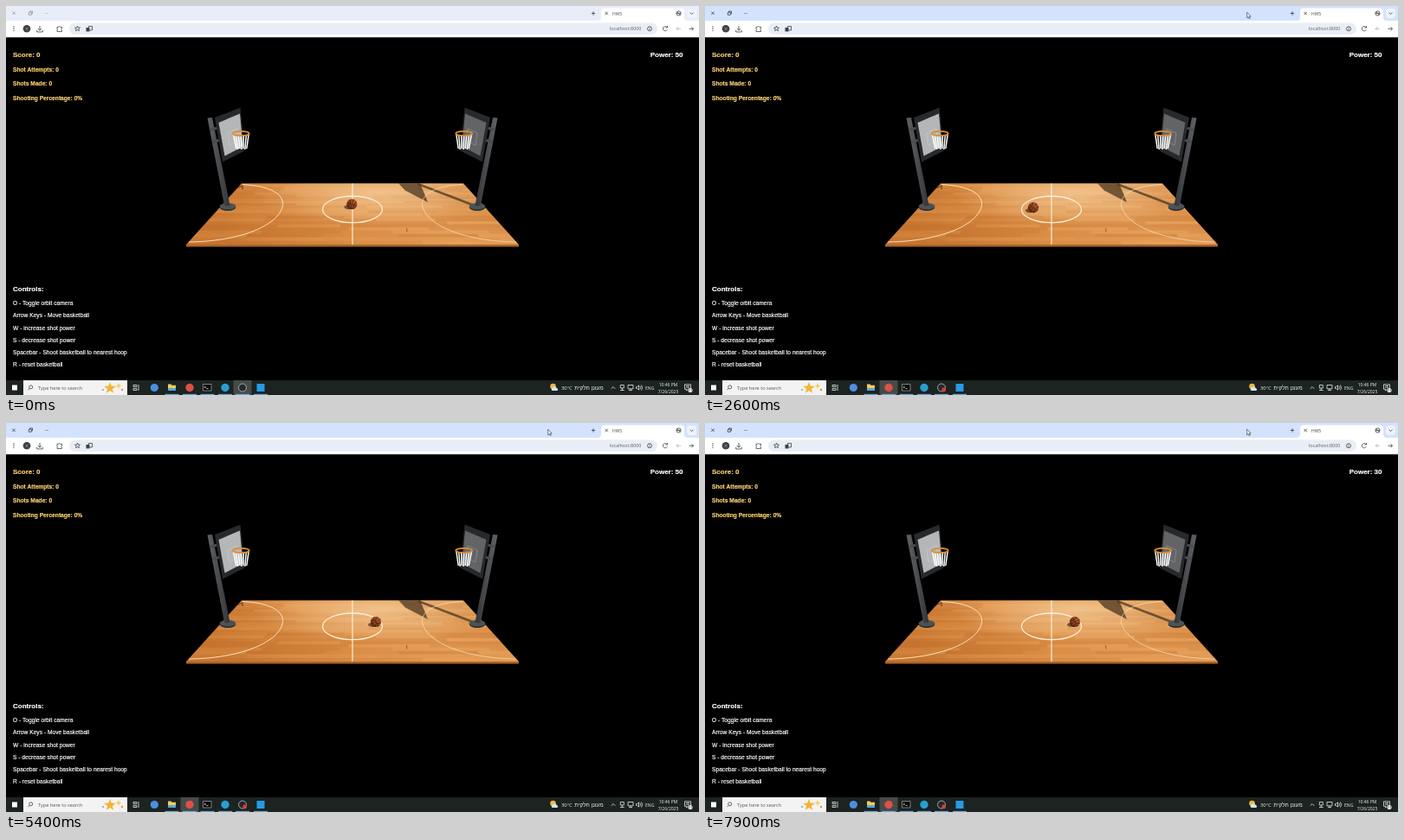
Write an HTML page that moves like this. It is 800 px wide and 450 px high and loops after 8 s.

```html
<!DOCTYPE html>
<html lang="en">
<head>
<meta charset="utf-8">
<title>Basketball court</title>
<style>
html, body { margin: 0; height: 100%; overflow: hidden; background: #000; }
svg { display: block; width: 100vw; height: 100vh; }
text { white-space: pre; }
.hud { font: 6.67px "Liberation Sans", Arial, sans-serif; fill: #fff; stroke: #fff; stroke-width: .18; }
.b { font-weight: bold; }
.big { font-size: 8px; font-weight: bold; }
.gold { fill: #ffd373; stroke: #ffd373; }
.ui { font: 5.5px "Open Sans", "Liberation Sans", sans-serif; }
.line { fill: none; stroke: #3c4043; stroke-width: .8; }
.pale { fill: none; stroke: #e8e8e8; stroke-width: .8; }
</style>
</head>
<body>
<svg viewBox="0 0 800 450">
  <defs>
    <linearGradient id="wood" x1="0" x2="1" y1=".2" y2="0">
      <stop offset="0" stop-color="#c97731"/>
      <stop offset=".35" stop-color="#dc9048"/>
      <stop offset=".65" stop-color="#e29b55"/>
      <stop offset="1" stop-color="#d98d47"/>
    </linearGradient>
    <radialGradient id="shine">
      <stop offset="0" stop-color="#ffe6bf" stop-opacity=".5"/>
      <stop offset="1" stop-color="#ffe6bf" stop-opacity="0"/>
    </radialGradient>
    <radialGradient id="leather" cx=".65" cy=".35" r=".75">
      <stop offset="0" stop-color="#b85a2b"/>
      <stop offset=".6" stop-color="#8a4020"/>
      <stop offset="1" stop-color="#3c1a0c"/>
    </radialGradient>
    <linearGradient id="steel">
      <stop offset="0" stop-color="#606265"/>
      <stop offset="1" stop-color="#333538"/>
    </linearGradient>
    <clipPath id="floor"><path d="M272 205.2H528L592 276H208Z"/></clipPath>
    <g id="hoop">
      <ellipse cx="256" cy="233" rx="9.3" ry="4" fill="#2b3034"/>
      <ellipse cx="256" cy="231.6" rx="9.3" ry="3.7" fill="#4b5358"/>
      <path d="M232.5 129.5L238 129L258.500 230.500Q255 232.500 252 230.500Z" fill="url(#steel)"/>
      <path d="M236 143L247 140.500M238 157.500L249 154.500" stroke="#4a4d50" stroke-width="3"/>
      <path d="M241 129L270.500 117.500L275.500 167.500L250 180.500Z" fill="#27292c"/>
      <path d="M245.500 135L270 124.500L273.500 162.500L252.500 173.500Z" fill="currentColor"/>
      <path d="M256 147L267 142L269 156L258 161Z" fill="none" stroke="#fff" stroke-opacity=".2"/>
      <path id="net" fill="none" stroke="#fff" stroke-width="1.5"/>
      <ellipse cx="271.300" cy="147.500" rx="9.500" ry="2.700" fill="none" stroke="#dc8e35" stroke-width="1.700"/>
    </g>
  </defs>

  <rect width="800" height="450"/>

  <path d="M208 276H592V278.500H208Z" fill="#a9652c"/>
  <g clip-path="url(#floor)">
    <rect x="208" y="205" width="384" height="71" fill="url(#wood)"/>
    <g id="planks"></g>
    <ellipse cx="428" cy="218" rx="140" ry="36" fill="url(#shine)"/>
    <path d="M453 205H478L487 227L461 213.500Z" fill="#4a361f" opacity=".75"/>
    <path d="M476 206L541 231" stroke="#4a361f" stroke-width="2.700" opacity=".75"/>
    <path d="M261 213L273 208V212" fill="none" stroke="#4a2c16" stroke-width="1.300" opacity=".7"/>
    <g fill="none" stroke="#fff0d8" stroke-width="1">
      <path d="M400 205V276" stroke-width="1.200"/>
      <ellipse cx="400" cy="235.300" rx="34.500" ry="15.300" stroke-width="1.300"/>
      <path id="arc" d="M273 206.500C306 208 319.500 218 319.500 228.500C319.500 249 280 272 211 273" opacity=".85"/>
      <use href="#arc" transform="matrix(-1 0 0 1 800 0)" opacity=".7"/>
    </g>
    <path d="M462.500 257L463 261.500" stroke="#c9472a" stroke-width="1"/>
  </g>
  <use href="#hoop" color="#b4b6b8"/>
  <use href="#hoop" color="#626466" transform="matrix(-1 0 0 1 800 0)"/>

  <g id="ball">
    <ellipse cx="-3.500" cy="3.300" rx="5.500" ry="2.600" fill="#3a2010" opacity=".65"/>
    <circle r="6" fill="url(#leather)"/>
    <path id="seams" d="M-6 0H6M0 -6V6M-4.200 -4.200Q0 0 -4.200 4.200M4.200 -4.200Q0 0 4.200 4.200" fill="none" stroke="#2a120a" stroke-width=".5"/>
  </g>

  <g class="hud" id="hud"></g>

  <rect id="tabs" width="800" height="17"/>
  <path d="M683 17Q687 17 687 13V6Q687 2.500 691 2.500H779Q783 2.500 783 6V13Q783 17 787 17Z" fill="#fff"/>
  <rect y="17" width="800" height="19.250" fill="#fff"/>
  <rect x="73" y="19.500" width="679" height="13.500" rx="6.700" fill="#e9eef6"/>
  <g id="windowIcons" class="line">
    <path d="M7.300 6.600L10.700 10M10.700 6.600L7.300 10M26.300 7.300h3v3h-3zM27.500 7V6h3v3h-1"/>
    <path d="M45 8.500h4" opacity=".5"/>
  </g>
  <rect x="786" y="3" width="11" height="11" rx="3.500" fill="#eef3fd"/>
  <g class="line">
    <path d="M678 6.300v4.400M675.800 8.500h4.400M691.500 6.800l3.400 3.400M694.900 6.800l-3.400 3.400M789.600 7.600l2 2l2 -2"/>
    <circle cx="776.500" cy="8.500" r="2.600"/>
    <path d="M774 8.500h5M775 6.500l3 4"/>
    <path d="M39 23v5M36.800 26l2.200 2.300l2.200 -2.300M35.700 28v2h6.600v-2"/>
    <path d="M59 24.300h1.700q.8 -2 1.800 0h2v2q-1.600 .8 0 1.600v1.700h-5.500v-1.700q1.400 -.8 0 -1.600z"/>
    <path d="M82.500 23.200l.9 2h2.100l-1.600 1.400l.5 2.100l-1.900 -1.100l-1.900 1.100l.5 -2.100l-1.600 -1.400h2.100z"/>
    <circle cx="743" cy="26.300" r="2.500"/>
    <path d="M743 26v1.600M743 24.500v.7M763.300 25a2.600 2.600 0 1 0 0 2.400M763.500 23v2h-2"/>
    <path d="M779 26.300h-5M776 24.200l-2 2.100l2 2.100" stroke="#aeb1b5"/>
    <path d="M788.500 26.300h5M791.500 24.200l2 2.100l-2 2.100"/>
    <path d="M95.500 23.500h4v4.500h-4z"/>
  </g>
  <g fill="#3c4043">
    <circle cx="9" cy="24" r=".7"/><circle cx="9" cy="26.300" r=".7"/><circle cx="9" cy="28.600" r=".7"/>
    <circle cx="24" cy="26.300" r="4.300"/>
    <path d="M92.500 25h4v4.500h-4z"/>
  </g>
  <path d="M22.500 25l3 2.800M25.500 25l-3 2.800" stroke="#9aa4ad" stroke-width=".8"/>
  <g class="ui" fill="#45484c">
    <text x="700" y="10.500" font-size="5">HW5</text>
    <text x="697" y="28.300" fill="#5b5f64" font-size="5.400">localhost:8000</text>
  </g>

  <rect y="433" width="800" height="17" fill="#1c2321"/>
  <rect id="active" y="433" width="21" height="17" fill="#454b49"/>
  <rect x="7" y="438.500" width="6" height="6" fill="#fff"/>
  <rect x="20" y="433" width="120" height="17" fill="#f3f3f3"/>
  <circle cx="28.700" cy="440.800" r="2" class="line"/>
  <path d="M27.200 442.400L25.500 444.200" class="line"/>
  <g fill="#f3b52e">
    <path d="M120 435l1.800 4.600l5 .3l-4 3l1.400 4.800l-4.200 -2.800l-4.200 2.800l1.400 -4.800l-4 -3l5 -.3z"/>
    <path d="M130 436l1 2.500l2.500 1l-2.500 1l-1 2.500l-1 -2.500l-2.500 -1l2.500 -1z" fill="#f7cc55"/>
    <circle cx="134" cy="444" r="1.200" fill="#e58e35"/><circle cx="112" cy="444" r="1" fill="#69a9dd"/>
  </g>
  <path class="pale" d="M147 438.500h4v2h-4zM147 442.500h4v2h-4zM153 438v7"/>
  <circle cx="171.300" cy="441.500" r="4.600" fill="#4b8fdf"/>
  <path d="M187 437.500h3.500l1 1.200h4.500v6.300h-9z" fill="#f5cb5c"/>
  <path d="M187 442h9v3h-9z" fill="#58a6d6"/>
  <circle cx="212" cy="441.500" r="4.700" fill="#dd5144"/>
  <path d="M227.500 437.500h9.500v7.500h-9.500z" fill="#080808" stroke="#a9adb0" stroke-width=".7"/>
  <path d="M229 440l1.500 1l-1.500 1M231.500 442.500h2" class="pale"/>
  <circle cx="253" cy="441.500" r="4.700" fill="#279fd2"/>
  <circle cx="273" cy="441.500" r="4.500" fill="#25282c" stroke="#d8dadc" stroke-width=".7"/>
  <circle id="recording" cx="275.700" cy="444" r="2.400" fill="#e33b36"/>
  <rect x="289.500" y="437" width="9" height="9" fill="#259be5"/>
  <path d="M183.500 449.400h16M204 449.400h16M224.500 449.400h16M245 449.400h16M265 449.400h16M286 449.400h16" stroke="#76b9ed" stroke-width="1"/>

  <circle cx="631.500" cy="440" r="3.300" fill="#f3b63c"/>
  <path d="M630.500 445a2 2 0 0 1 .5 -3.500a2.600 2.600 0 0 1 4.700 .5a1.600 1.600 0 0 1 .6 3z" fill="#d5e4f2"/>
  <g class="pale">
    <path d="M698.700 442.800l2.300 -2.300l2.300 2.300"/>
    <path d="M709.300 438.500h4v3.500h-4zM711.300 442v2.500M709 444.500h4.600"/>
    <path d="M718 438.500h6v4.300h-6zM721 443v1.600M719 444.600h4"/>
    <path d="M727.500 440.500h1l2 -1.600v5.200l-2 -1.600h-1zM732 439.700q1.400 1.800 0 3.600M733.500 438.500q2.200 3 0 6"/>
    <path d="M783.500 437.800h7v5.500h-3l-2 1.700v-1.700h-2zM785 439.500h4M785 441.300h4"/>
  </g>
  <circle cx="790" cy="444.500" r="2.600" fill="#e4e6e8"/>
  <g class="ui">
    <text x="37" y="443.700" fill="#555" font-size="5.600">Type here to search</text>
    <g fill="#f1f1f1">
      <text x="641" y="443.700" font-size="5.800">30°C</text>
      <text x="673" y="443.700" font-size="6.500" text-anchor="middle">מעונן חלקית</text>
      <text x="738" y="443.700" font-size="5.100">ENG</text>
      <text x="764.500" y="439.600" font-size="5" text-anchor="middle">10:46 PM</text>
      <text x="764.500" y="447.500" font-size="5" text-anchor="middle">7/26/2025</text>
    </g>
    <text x="790" y="446" font-size="3.800" text-anchor="middle" fill="#222">11</text>
  </g>

  <path id="cursor" d="M0 0V6.500L1.500 5.200L2.500 7.400L3.500 6.900L2.500 4.800H4.500Z" fill="#fff" stroke="#222" stroke-width=".6"/>
</svg>
<script>
const $ = id => document.getElementById(id);
const LOOP = 8000;

// HUD: text, x, baseline, classes
const hud = [
  ["Score: 0", 8, 59.2, "big gold"],
  ["Shot Attempts: 0", 8, 75.8, "b gold"],
  ["Shots Made: 0", 8, 92.2, "b gold"],
  ["Shooting Percentage: 0%", 8, 108.6, "b gold"],
  ["Power: 50", 743.7, 59.2, "big"],
  ["Controls:", 8, 330.2, "big"],
  ...["O - Toggle orbit camera", "Arrow Keys - Move basketball", "W - increase shot power",
    "S - decrease shot power", "Spacebar - Shoot basketball to nearest hoop", "R - reset basketball"]
    .map((s, i) => [s, 8, 346.2 + i * 14.15, ""])
];
$("hud").innerHTML = hud.map(([s, x, y, c]) => `<text x="${x}" y="${y}" class="${c}">${s}</text>`).join("");
const power = $("hud").children[4];

// Floorboards in perspective: u runs from the front edge to the back edge
let seed = 7;
const random = () => (seed = seed * 16807 % 2147483647) / 2147483647;
const halfWidth = u => 1 / ((1 - u) / 192 + u / 128);
const spot = (x, u) => {
  const w = halfWidth(u);
  return `${(400 + x * w).toFixed(1)} ${(205.2 + (w - 128) * 70.8 / 64).toFixed(1)}`;
};
const rows = 24;
let boards = "";
for (let i = 0; i < rows; i++) {
  const near = i / rows, far = (i + 1) / rows;
  for (let x = -1 - random() * .4; x < 1;) {
    const end = x + .3 + random() * .5;
    const tone = random() < .55 ? "#a2531a" : "#f9c27c";
    boards += `<path d="M${spot(x, near)}L${spot(end, near)}L${spot(end, far)}L${spot(x, far)}Z" ` +
      `fill="${tone}" fill-opacity="${(random() * .17).toFixed(2)}"/>`;
    x = end;
  }
}
$("planks").innerHTML = boards;

let strands = "";
for (let i = 0; i <= 6; i++) {
  const side = i / 3 - 1;
  strands += `M${271.3 + side * 9} ${147.5 + 2.5 * Math.sqrt(1 - side * side)}L${271.8 + side * 6} ${165 + (i % 2)}`;
}
$("net").setAttribute("d", strands);

// Keys: time, x, y
const ballPath = [[1750, 399.3, 229.3], [2300, 372, 229.3], [2600, 379, 233.2], [3050, 386, 242], [3700, 428.5, 242], [4500, 427, 230]];
const cursorPath = [[300, 802, 60], [900, 625.7, 7.3]];
function along(keys, t) {
  const i = keys.findIndex(k => k[0] > t);
  if (i === 0) return keys[0].slice(1);
  if (i < 0) return keys.at(-1).slice(1);
  const a = keys[i - 1], b = keys[i], p = (t - a[0]) / (b[0] - a[0]);
  return [a[1] + (b[1] - a[1]) * p, a[2] + (b[2] - a[2]) * p];
}
const place = (id, x, y, more = "") => $(id).setAttribute("transform", `translate(${x} ${y}) ${more}`);

function draw(now) {
  const t = now % LOOP;
  const focused = t >= 1000;
  const [x, y] = along(ballPath, t);
  place("ball", x, y, `scale(${1 + (y - 230) * .006})`);
  $("seams").setAttribute("transform", `rotate(${20 + (x - 399.3) * 8})`);
  place("cursor", ...along(cursorPath, t));
  $("tabs").setAttribute("fill", focused ? "#d3e3fd" : "#e8eef9");
  $("windowIcons").setAttribute("opacity", focused ? 1 : .5);
  $("active").setAttribute("x", focused ? 201.5 : 262.5);
  $("recording").setAttribute("opacity", t < 500 ? 0 : 1);
  const presses = [5800, 6450, 7050, 7550].filter(p => t >= p).length;
  power.textContent = "Power: " + (50 - 5 * presses);
  requestAnimationFrame(draw);
}
draw(performance.now());
</script>
</body>
</html>
```
